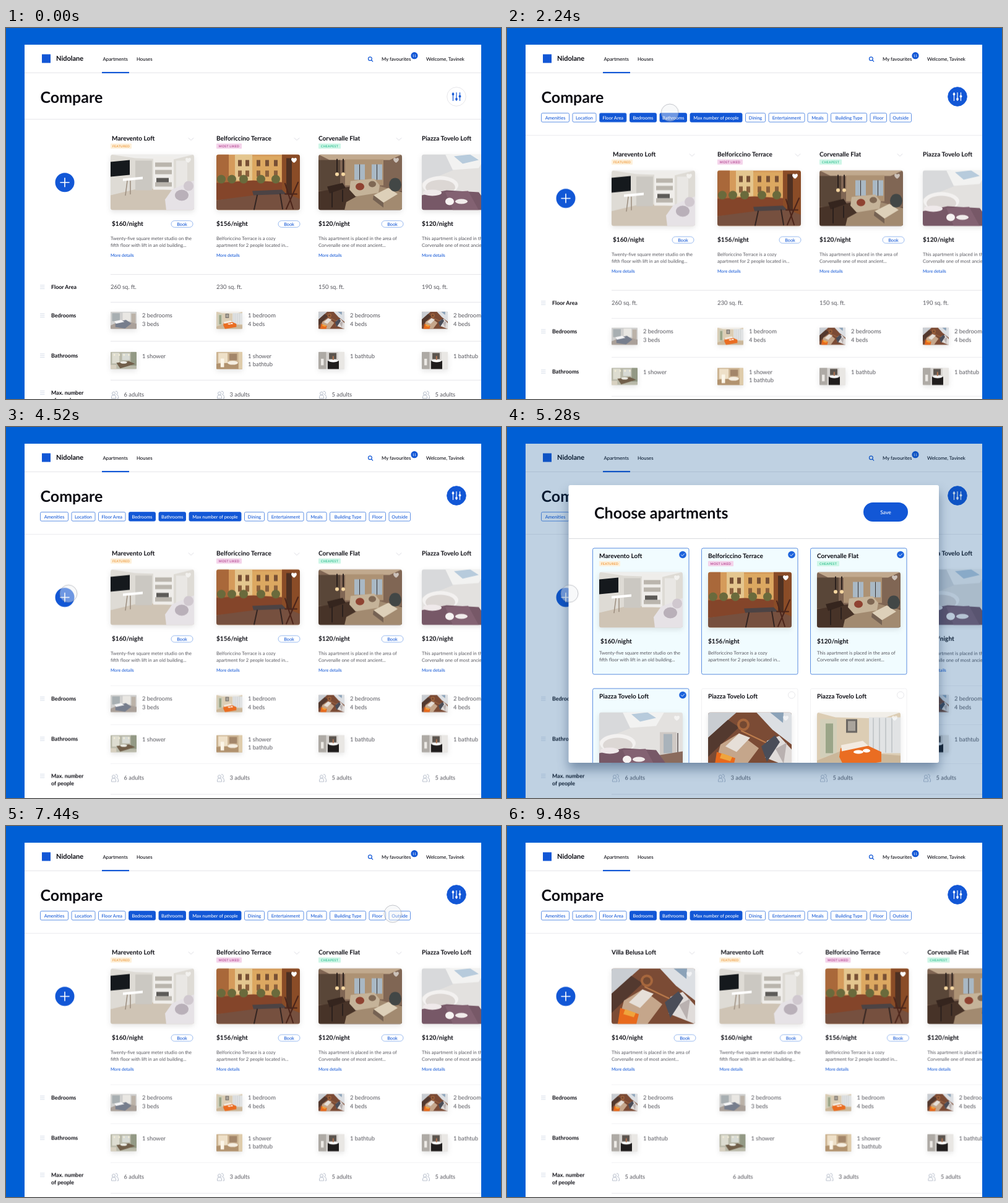
An HTML page for the animation above (9520 ms loop, 800 by 600 pixels).

```html
<!DOCTYPE html>
<html lang="en">
<head>
<meta charset="utf-8">
<title>Compare apartments</title>
<style>
html, body { margin: 0; width: 100%; height: 100%; overflow: hidden; background: #005fd5; }
svg { display: block; }
text { font-family: Lato, "Open Sans", sans-serif; fill: #0b0b12; text-rendering: geometricPrecision; }
.b { font-weight: 700; }
.m { font-weight: 500; }
.grey { fill: #55555c; }
.blue { fill: #1257d6; }
.white { fill: #fff; }
.mid { text-anchor: middle; }
.rule { stroke: #e6e6ea; fill: none; }
.outline { fill: #fff; stroke: #4d85e2; stroke-width: .9; }
.photo { filter: drop-shadow(0 3px 4px rgba(0, 0, 0, .1)); }

.drop, .chips, .btn, .btn-icon, .chip-off, .chip-text, .floor, .collapse, .slide, .fresh,
.gone, .overlay, .modal, .scroll, .pick, .cursor {
  animation: 9520ms cubic-bezier(.4, 0, .2, 1) infinite both;
}
.drop { animation-name: drop; }
.chips { animation-name: chips; }
.btn { animation-name: btn; }
.btn-icon { animation-name: btn-icon; }
.chip-off { animation-name: chip-off; }
.chip-text { animation-name: chip-text; }
.floor { animation-name: floor; }
.collapse { animation-name: collapse; }
.slide { animation-name: slide; }
.fresh { animation-name: fresh; }
.gone { animation-name: gone; }
.overlay { animation-name: overlay; }
.modal { animation-name: modal; }
.scroll { animation-name: scroll; }
.pick { animation-name: pick; }
.cursor { animation-name: cursor; }

@keyframes drop { 0%, 10.3% { transform: none } 12.5%, 100% { transform: translateY(25.7px) } }
@keyframes chips { 0%, 10.6% { opacity: 0 } 12.5%, 100% { opacity: 1 } }
@keyframes btn { 0%, 10% { fill: #fff; stroke: #e6e6ea } 11.8%, 100% { fill: #1257d6; stroke: #1257d6 } }
@keyframes btn-icon { 0%, 10% { color: #1257d6 } 11.8%, 100% { color: #fff } }
@keyframes chip-off { 0%, 35.7% { fill: #1257d6 } 37.3%, 100% { fill: #fff } }
@keyframes chip-text { 0%, 35.7% { fill: #fff } 37.3%, 100% { fill: #1257d6 } }
@keyframes floor { 0%, 36.6% { opacity: 1 } 39%, 100% { opacity: 0 } }
@keyframes collapse { 0%, 37.3% { transform: none } 41.5%, 100% { transform: translateY(-51.2px) } }
@keyframes slide { 0%, 81.5% { transform: none } 87.8%, 100% { transform: translateX(174.4px) } }
@keyframes fresh { 0%, 85.6% { opacity: 0 } 90.3%, 100% { opacity: 1 } }
@keyframes gone { 0%, 81.5% { opacity: 1 } 84%, 100% { opacity: 0 } }
@keyframes overlay { 0%, 50% { opacity: 0 } 53.4%, 74.6% { opacity: 1 } 77.3%, 100% { opacity: 0 } }
@keyframes modal {
  0%, 50.4% { opacity: 0; transform: translateY(40px) }
  54.2%, 74.4% { opacity: 1; transform: none }
  77%, 100% { opacity: 0; transform: translateY(40px) }
}
@keyframes scroll { 0%, 56.7% { transform: none } 63.2%, 100% { transform: translateY(-97px) } }
@keyframes pick { 0%, 67.2% { opacity: 0 } 68.3%, 100% { opacity: 1 } }
@keyframes cursor {
  0%, 2.5% { transform: translate(660px, 200px); opacity: 0 }
  4.5% { transform: translate(668px, 192px); opacity: 1 }
  8.8%, 9.4% { transform: translate(728px, 111px) }
  10.2% { transform: translate(728px, 111px) scale(.82) }
  11.3%, 15.5% { transform: translate(728px, 111px) }
  30%, 35% { transform: translate(172px, 142px) }
  35.8% { transform: translate(172px, 142px) scale(.82) }
  36.8%, 39.5% { transform: translate(172px, 142px) }
  46%, 48% { transform: translate(101px, 269.5px) }
  48.9% { transform: translate(101px, 269.5px) scale(.82) }
  50%, 56.2% { transform: translate(101px, 269.5px) }
  63.2%, 66.2% { transform: translate(382px, 415px) }
  67.2% { transform: translate(382px, 415px) scale(.82) }
  68.2%, 69.2% { transform: translate(382px, 415px) }
  73%, 73.6% { transform: translate(612px, 137px) }
  74.3% { transform: translate(612px, 137px) scale(.82) }
  75.3% { transform: translate(612px, 137px) }
  78.2% { transform: translate(625px, 142px); opacity: 1 }
  80.6%, 100% { transform: translate(629px, 144px); opacity: 0 }
}
</style>
</head>
<body>
<svg id="stage" width="800" height="600" viewBox="0 0 800 600"></svg>
<script>
const rect = (x, y, w, h, fill, more = '') =>
  `<rect x="${x}" y="${y}" width="${w}" height="${h}" fill="${fill}" ${more}/>`;
const poly = (points, fill) => `<polygon points="${points}" fill="${fill}"/>`;
const oval = (x, y, rx, ry, fill) => `<ellipse cx="${x}" cy="${y}" rx="${rx}" ry="${ry}" fill="${fill}"/>`;
const line = (d, color, width = 1) =>
  `<path d="${d}" stroke="${color}" stroke-width="${width}" fill="none" stroke-linecap="round"/>`;
// y is the middle of the capitals
const label = (x, y, string, size, cls = '', more = '') =>
  `<text x="${x}" y="${y + size * .36}" font-size="${size}" class="${cls}" ${more}>${string}</text>`;
const group = (cls, ...parts) => `<g class="${cls}">${parts.join('')}</g>`;
const rule = (x, y) => `<path class="rule" d="M${x} ${y}H768"/>`;

const scenes = {
  living: rect(0, 0, 135, 90, '#dedbd5') + poly('0,0 135,0 102,8 40,6', '#efeeec')
    + poly('0,66 50,54 135,60 135,90 0,90', '#cfc4b5') + poly('0,12 31,9 31,33 0,36', '#15191d')
    + rect(40, 10, 27, 48, '#cbc8c2') + rect(69, 4, 33, 53, '#efedea')
    + [13, 25, 45].map(y => rect(72, y, 27, 7, '#bab5ad')).join('') + rect(74, 38, 20, 7, '#5d5b58')
    + rect(106, 10, 18, 48, '#e9e7e4') + poly('20,39 52,36 52,40 20,43', '#fff')
    + line('M27 43L24 66M32 43V64', '#9b8d7e', 1.5) + poly('88,73 100,56 135,42 135,90 90,90', '#e6e2e6')
    + oval(115, 66, 11, 9, '#b9b0b9') + oval(126, 51, 8, 8, '#d0c8cf'),
  terrace: rect(0, 0, 135, 90, '#d59b5b') + rect(0, 0, 20, 48, '#a9683a') + rect(30, 0, 28, 42, '#e4c68f')
    + rect(58, 3, 47, 40, '#dca861')
    + [35, 47, 65, 79, 93].map(x => rect(x, 9, 6, 10, '#775035') + rect(x, 26, 6, 10, '#8b603d')).join('')
    + rect(106, 0, 29, 78, '#8a4c27') + rect(113, 6, 9, 60, '#4d3022')
    + poly('0,46 60,42 106,45 106,66 0,74', '#84452a') + poly('0,74 106,60 135,72 135,90 0,90', '#76503f')
    + [8, 25, 44, 72, 96].map(x => oval(x, 40, 7, 7, '#6a6a3c')).join('')
    + poly('58,59 106,57 113,64 60,66', '#4c4344') + line('M66 66L61 89M103 64L107 88', '#332522', 2)
    + line('M111 47L124 88M132 45L113 88M111 64H130', '#4a241a', 2),
  lounge: rect(0, 0, 135, 90, '#806654') + poly('0,0 135,0 115,9 18,9', '#c1a98e')
    + rect(0, 9, 35, 50, '#594638') + rect(43, 8, 62, 42, '#ad9274')
    + [58, 86].map(x => rect(x, 16, 17, 25, '#a9b8c4') + rect(x + 8, 16, 1, 25, '#3a3433')).join('')
    + poly('0,60 58,51 135,60 135,90 0,90', '#473328') + poly('45,77 94,50 135,61 135,90 42,90', '#a28a70')
    + poly('52,43 90,39 99,50 97,62 60,68 50,57', '#c5b399') + oval(67, 52, 7, 6, '#8f4231')
    + oval(87, 48, 6, 5, '#7f6854') + poly('89,66 113,54 128,64 105,78', '#ddd0b9')
    + poly('89,66 105,78 105,86 88,73', '#756253') + oval(124, 49, 10, 11, '#424746')
    + poly('14,52 39,46 44,54 18,63', '#35251e') + line('M22 61V85M39 58V76M30 8V30M40 8V30', '#2b201d', 2)
    + oval(30, 32, 3, 3, '#f5d6a0') + oval(40, 32, 3, 3, '#f5d6a0'),
  attic: rect(0, 0, 135, 90, '#e3e1df') + poly('0,0 45,0 52,25 0,46', '#d8d9db')
    + poly('38,0 105,0 92,22 50,25', '#f2f2f1') + poly('52,3 78,0 92,9 66,15', '#b7cbdc')
    + oval(30, 50, 29, 15, '#f3f1f0') + oval(30, 53, 24, 12, '#dcd7d4')
    + rect(98, 32, 27, 40, '#cfc9c5') + rect(104, 35, 14, 31, '#a9b3bb') + line('M127 34V66', '#5a5050', 1.5)
    + poly('92,70 135,63 135,90 100,90', '#8a6b5d')
    + poly('0,66 40,58 92,61 113,90 0,90', '#775867') + poly('38,61 75,59 92,90 50,90', '#836272')
    + oval(17, 62, 15, 5, '#efe9ea') + oval(45, 76, 7, 6, '#f7f3f2') + oval(64, 76, 10, 4, '#f1eceb'),
  aerial: rect(0, 0, 135, 90, '#7b4b35') + poly('0,0 46,0 0,41', '#c9cdd2') + poly('0,41 32,12 50,24 0,72', '#53392f')
    + poly('78,0 135,0 135,52 104,28', '#dcdfe3') + poly('100,0 122,0 121,17', '#8ba2b8')
    + poly('20,52 50,34 82,58 58,90 10,90', '#c5a68b') + poly('50,34 68,41 46,64 28,55', '#e6dfd8')
    + poly('14,64 44,74 40,90 10,90', '#e8691c') + poly('22,66 39,72 36,79 19,74', '#f0a43c')
    + line('M54 30L100 52', '#bd7c4c', 2) + oval(57, 20, 10, 10, '#a7673d') + oval(57, 20, 6, 6, '#744932')
    + poly('95,46 115,38 135,60 135,90 92,73', '#e0dcda') + poly('86,55 108,37 116,48 95,80', '#4a4d58')
    + poly('109,59 127,49 122,83', '#b9b1b0'),
  orange: rect(0, 0, 135, 90, '#dccdb4') + poly('0,0 135,0 106,10 30,8', '#f1eee8') + rect(5, 11, 27, 62, '#d2cfba')
    + rect(14, 18, 12, 48, '#9aa588') + rect(47, 11, 18, 22, '#6b6763') + rect(50, 14, 12, 16, '#aaa49c')
    + rect(84, 8, 51, 58, '#e1e3e4') + [90, 100, 110, 120].map(x => rect(x, 9, 2, 56, '#c5c9cb')).join('')
    + poly('0,78 40,62 135,70 135,90 0,90', '#cbb79a') + poly('38,58 74,50 104,64 104,80 45,90 36,72', '#ea6d22')
    + poly('39,53 74,46 83,54 40,63', '#f3eae0') + oval(67, 64, 8, 3, '#fff') + oval(80, 62, 6, 3, '#fff'),
  greyBed: rect(0, 0, 135, 90, '#d0d0cf') + rect(8, 8, 40, 42, '#a8afb2') + rect(63, 5, 40, 44, '#e9e7e3')
    + rect(108, 10, 22, 50, '#bbb2a8') + poly('0,72 60,45 135,62 135,90 0,90', '#aaa099')
    + poly('25,55 80,43 108,62 75,88 25,80', '#777e8d') + poly('20,50 55,43 72,53 28,63', '#f5f5f6'),
  greenBath: rect(0, 0, 135, 90, '#b9b9a9') + rect(8, 5, 38, 55, '#dddcd0') + rect(60, 8, 40, 35, '#d7dad4')
    + [20, 45, 70, 95].map(x => oval(x, 16, 4, 5, '#f4efd8')).join('') + rect(105, 0, 30, 72, '#939985')
    + poly('30,57 95,48 128,63 50,86', '#715f4a') + oval(68, 55, 18, 6, '#eeeee7') + rect(0, 68, 30, 22, '#d7d0c0'),
  beigeBath: rect(0, 0, 135, 90, '#cdb594') + rect(10, 6, 48, 52, '#eee0c8') + rect(67, 10, 40, 34, '#a3866a')
    + poly('0,62 135,53 135,90 0,90', '#b1926e') + oval(85, 57, 27, 10, '#f5eee1') + rect(22, 35, 18, 45, '#fbf5e8')
    + rect(115, 0, 20, 90, '#dfccab'),
  blackBath: rect(0, 0, 135, 90, '#d5d2cf') + rect(0, 0, 40, 90, '#aeaaa5') + rect(55, 6, 38, 32, '#5c554f')
    + rect(102, 0, 33, 90, '#e9e7e4') + rect(48, 47, 58, 43, '#201d1d') + oval(77, 47, 25, 7, '#fff')
    + rect(73, 22, 7, 20, '#ad7453') + rect(13, 36, 14, 34, '#ece9e5')
};

const tags = {
  FEATURED: [34, '#fdf0da', '#f0993c'],
  'MOST LIKED': [41, '#f4d3ea', '#b0438f'],
  CHEAPEST: [36, '#cef6e7', '#35c193']
};
const areaText = ['This apartment is placed in the area of', 'Corvenalle one of most ancient...'];
const flats = [
  { name: 'Marevento Loft', tag: 'FEATURED', price: 160, photo: 'living',
    about: ['Twenty-five square meter studio on the', 'fifth floor with lift in an old building...'],
    area: 260, beds: ['2 bedrooms', '3 beds'], bedPic: 'greyBed', baths: ['1 shower'], bathPic: 'greenBath', adults: 6 },
  { name: 'Belforiccino Terrace', tag: 'MOST LIKED', price: 156, photo: 'terrace',
    about: ['Belforiccino Terrace is a cozy', 'apartment for 2 people located in...'],
    area: 230, beds: ['1 bedroom', '4 beds'], bedPic: 'orange', baths: ['1 shower', '1 bathtub'], bathPic: 'beigeBath', adults: 3 },
  { name: 'Corvenalle Flat', tag: 'CHEAPEST', price: 120, photo: 'lounge', about: areaText,
    area: 150, beds: ['2 bedrooms', '4 beds'], bedPic: 'aerial', baths: ['1 bathtub'], bathPic: 'blackBath', adults: 5 },
  { name: 'Piazza Tovelo Loft', price: 120, photo: 'attic', about: areaText,
    area: 190, beds: ['2 bedrooms', '4 beds'], bedPic: 'aerial', baths: ['1 bathtub'], bathPic: 'blackBath', adults: 5 }
];
const added = { ...flats[3], name: 'Villa Belusa Loft', price: 140, photo: 'aerial' };
const columns = [169, 340, 505, 672];
const bookOffsets = [98, 100, 102, 102];

const picture = (name, x, y, w, h) => `<use href="#${name}" x="${x}" y="${y}" width="${w}" height="${h}" class="photo"/>`;
const heart = (x, y, solid) =>
  `<path transform="translate(${x} ${y})" d="M0 4.5C-7.5 0-4-6 0-2.6C4-6 7.5 0 0 4.5Z" fill="#fff" opacity="${solid ? 1 : .6}"/>`;
const tagBadge = (name, x, y) => {
  if (!name) return '';
  const [w, back, ink] = tags[name];
  return rect(x, y - 4.2, w, 8.4, back, 'rx="1"')
    + label(x + w / 2, y, name, 5, 'b mid', `style="fill:${ink}" letter-spacing=".35"`);
};
const aboutLines = (flat, x, y) => flat.about.map((s, i) => label(x, y + i * 10.8, s, 7.6, 'grey')).join('');

function column(flat, x, bookX, nudge) {
  return label(x + nudge, 178, flat.name, 10.1, 'b')
    + line(`M${x + 126} 178l4 3.5l4-3.5`, '#d5d5dc', .8)
    + tagBadge(flat.tag, x, 191)
    + picture(flat.photo, x, 204.5, 135, 90) + heart(x + 125.5, 213.5, flat.tag === 'MOST LIKED')
    + label(x + nudge, 316.5, `$${flat.price}/night`, 10.1, 'b')
    + rect(bookX, 311.7, 35, 10.6, '#fff', 'rx="5.3" class="outline" style="stroke:#8db2ee"')
    + label(bookX + 17.5, 317, 'Book', 7.3, 'm blue mid')
    + aboutLines(flat, x, 340.5) + label(x, 368, 'More details', 6.9, 'm blue');
}
const people = (x, y) =>
  `<path transform="translate(${x} ${y})" d="M-5.5 6V3.5Q-5.5 .5-2 .5Q1.5 .5 1.5 3.5V6ZM-4.5-2a2.5 2.5 0 1 0 5 0a2.5 2.5 0 1 0-5 0M1-5.5a2.6 2.6 0 1 1 1.5 5Q5.5 .5 5.5 3.5V6H3.5" fill="none" stroke="#a4adbd" stroke-width=".8"/>`;
const rows = {
  area: (f, x) => label(x, 419, `${f.area} sq. ft.`, 9.5, 'grey'),
  beds: (f, x) => picture(f.bedPic, x, 458.7, 42, 28) + f.beds.map((s, i) => label(x + 51, 465 + i * 13.4, s, 9.4, 'grey')).join(''),
  baths: (f, x) => picture(f.bathPic, x, 523.7, 42, 28) + f.baths.map((s, i) => label(x + 51, 530.5 + i * 13.4, s, 9.4, 'grey')).join(''),
  adults: (f, x) => group(f === flats[0] ? 'gone' : '', people(x + 7, 593)) + label(x + 21.5, 593, `${f.adults} adults`, 9.4, 'grey')
};
const cells = (draw) => group('slide', ...flats.map((f, i) => draw(f, columns[i], i))) + group('fresh', draw(added, 169, -1));
const rowLabel = (y, ...strings) => line(`M55.5 ${y - 3}h6.5m-6.5 2.8h6.5m-6.5 2.8h6.5`, '#ccd5e3', .8)
  + strings.map((s, i) => label(73, y + i * 11.4, s, 8.9, 'b')).join('');

const chipList = [['Amenities', 55.5, 45], ['Location', 106, 38], ['Floor Area', 149.5, 43.5], ['Bedrooms', 198.5, 43],
  ['Bathrooms', 247, 43.5], ['Max number of people', 296, 84], ['Dining', 385.5, 32], ['Entertainment', 423, 58],
  ['Meals', 486, 32], ['Building Type', 523.5, 58], ['Floor', 587, 26.5], ['Outside', 619, 34.5]];
const chips = chipList.map(([s, x, w], i) => {
  const on = i > 2 && i < 6, floor = i === 2;
  return rect(x, 137.7, w, 14.4, '#fff', `rx="2" class="outline ${floor ? 'chip-off' : ''}" ${on ? 'style="fill:#1257d6;stroke:#1257d6"' : ''}`)
    + label(x + w / 2, 145, s, 7.4, `m mid ${floor ? 'chip-text' : on ? 'white' : 'blue'}`);
}).join('');

function modalCard(flat, i) {
  const x = 138.5 + i % 3 * 176, y = i < 3 ? 196 : 423, left = x + 10.5;
  const frame = (fill, stroke) => rect(x, y, 155.5, 204, fill, `rx="2.5" stroke="${stroke}"`);
  const chosen = frame('#f1fcff', '#5c8fe2')
    + oval(x + 145.5, y + 10.5, 5.8, 5.8, '#1b62dc') + line(`M${x + 143} ${y + 10.7}l1.8 1.8l3.4-3.6`, '#fff', .9);
  return frame('#fff', '#f0f0f2')
    + `<circle cx="${x + 145.5}" cy="${y + 10.5}" r="5.5" fill="#fff" stroke="#e6e6ea"/>`
    + (i < 4 ? chosen : i === 4 ? group('pick', chosen) : '')
    + label(left, y + 12, flat.name, 10.1, 'b') + tagBadge(flat.tag, left, y + 25)
    + picture(flat.photo, left, y + 38.5, 135, 90) + heart(left + 125.5, y + 47.5, i === 1)
    + label(left + (i ? 0 : 2), y + 150.5, `$${flat.price}/night`, 10.1, 'b') + aboutLines(flat, left, y + 169);
}
const choices = [...flats, { ...flats[3], photo: 'aerial' }, { ...flats[3], photo: 'orange' }];

const header = rect(58, 42.5, 14, 14, '#1257d6') + label(81, 49.5, 'Nidolane', 11, 'b')
  + label(156.5, 50.5, 'Apartments', 7.8, 'm') + label(211, 50.5, 'Houses', 7.8, 'm')
  + rule(30, 72.5) + rect(155, 71, 44, 2.2, '#1257d6')
  + '<circle cx="588.4" cy="49.8" r="2.9" fill="none" stroke="#1257d6" stroke-width="1.2"/>' + line('M590.7 52.1l2 2', '#1257d6', 1.3)
  + label(607, 50.5, 'My favourites', 7.8, 'm') + oval(660, 44.7, 5.6, 5.6, '#1257d6') + label(660, 44.7, '11', 5.6, 'white mid')
  + label(679, 50.5, 'Welcome, Tavinek', 7.8, 'm');
const filterButton = '<circle class="btn" cx="728" cy="111" r="15.3"/>'
  + group('btn-icon', line('M722.5 104.5V117.5M728 104.5V117.5M733.5 104.5V117.5', 'currentColor', 1.2),
    ...[[722.5, 107], [728, 115], [733.5, 110.5]].map(([x, y]) => oval(x, y, 1.9, 1.9, 'currentColor')));

const board = group('drop', rule(30, 147.5),
  oval(95, 249.7, 15.5, 15.5, '#1257d6') + line('M88 249.7H102M95 242.7V256.7', '#fff', 1.6),
  cells((f, x, i) => column(f, x, x + (i < 0 ? 101 : bookOffsets[i]), i ? 0 : 2)),
  group('floor', rule(169, 398.5), rowLabel(419, 'Floor Area'), cells(rows.area)),
  group('collapse', rule(169, 443.5), rowLabel(465, 'Bedrooms'), cells(rows.beds),
    rule(169, 506.5), rowLabel(530, 'Bathrooms'), cells(rows.baths),
    rule(169, 569.5), rowLabel(590, 'Max. number', 'of people'), cells(rows.adults), rule(169, 619)));

const modal = group('modal',
  rect(99.5, 94, 598.5, 449, '#fff', 'rx="3" style="filter:drop-shadow(0 11px 9px rgba(0,35,75,.38))"'),
  label(141, 138.5, 'Choose apartments', 25, 'b'),
  rect(576, 122, 72, 31, '#1257d6', 'rx="15.5"'), label(612, 137.5, 'Save', 8.6, 'm white mid'),
  `<g clip-path="url(#list)">${group('scroll', ...choices.map(modalCard))}</g>`,
  '<path d="M99.5 180.5H698" stroke="#d9dade"/>');

document.getElementById('stage').innerHTML = `<defs>
  <clipPath id="page"><rect x="30" y="27" width="738" height="573"/></clipPath>
  <clipPath id="list"><rect x="99.5" y="180.5" width="598.5" height="362.5"/></clipPath>
  <clipPath id="corners"><rect width="135" height="90" rx="4"/></clipPath>
  ${Object.entries(scenes).map(([id, art]) => `<symbol id="${id}" viewBox="0 0 135 90" preserveAspectRatio="none"><g clip-path="url(#corners)">${art}</g></symbol>`).join('')}
  </defs>`
  + rect(0, 0, 800, 600, '#005fd5')
  + `<g clip-path="url(#page)">${rect(30, 27, 738, 573, '#fff')}${header}${label(55.5, 111.5, 'Compare', 25, 'b')}
    ${filterButton}${group('chips', chips)}${board}
    ${rect(30, 27, 738, 573, 'rgba(0,72,140,.25)', 'class="overlay"')}</g>`
  + modal
  + '<circle class="cursor" r="14" fill="rgba(238,240,243,.42)" stroke="rgba(120,125,135,.55)" stroke-width=".8"/>';
</script>
</body>
</html>
```
